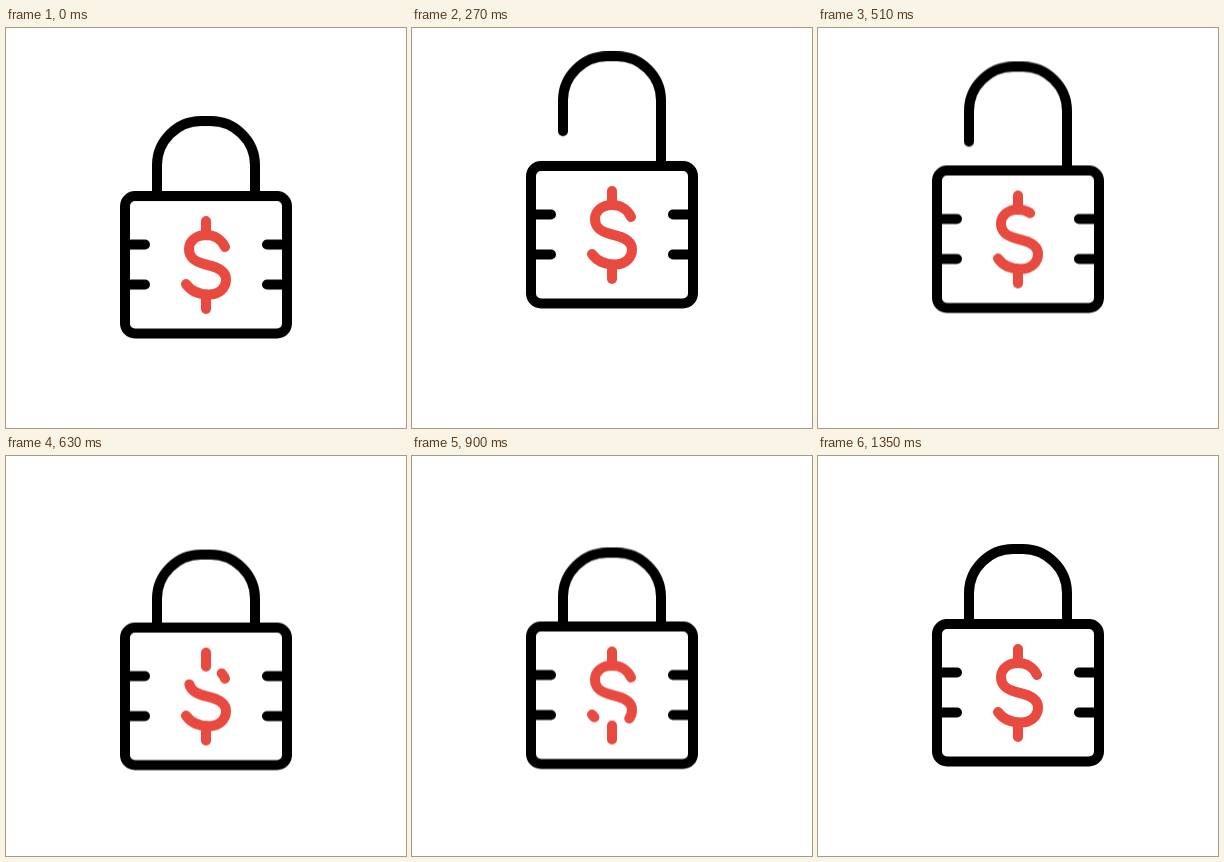
These frames come from a looping animation (400 px wide and 400 px high, 1.41 s). An HTML page:

```html
<!DOCTYPE html>
<html lang="en">
<head>
<meta charset="utf-8">
<title>Padlock</title>
<style>
  html, body { margin: 0; width: 100%; height: 100%; overflow: hidden; background: #fff; }
  svg { display: block; width: 100%; height: 100%; }
  .line { fill: none; stroke: #000; stroke-width: 10; stroke-linecap: round; stroke-linejoin: round; }
  .money { stroke: #e84a3f; }
  .curve { stroke-dasharray: 100 200; }

  .lock, .shackle, .curve { animation: 1410ms linear infinite; }
  .lock { animation-name: hop; }
  .shackle { animation-name: latch; }
  .tail { animation-name: erase; }
  .head { animation-name: draw; }

  /* squat, jump, land, settle */
  @keyframes hop {
    0% { transform: translateY(0); animation-timing-function: ease-in-out; }
    4.61% { transform: translateY(14px); animation-timing-function: cubic-bezier(.333, 1, .667, 1); }
    24.82% { transform: translateY(-31px); }
    26.24% { transform: translateY(-31px); animation-timing-function: cubic-bezier(.333, 0, .667, 0); }
    46.45% { transform: translateY(14px); animation-timing-function: cubic-bezier(.333, .667, .667, 1); }
    76.6%, 100% { transform: translateY(0); }
  }

  /* shackle relative to the body */
  @keyframes latch {
    0% { transform: translateY(0); animation-timing-function: ease-in-out; }
    4.61% { transform: translateY(7px); animation-timing-function: ease-out; }
    7.09% { transform: translateY(0); }
    10.28% { transform: translateY(0); animation-timing-function: cubic-bezier(.333, .8, .667, 1); }
    25.53% { transform: translateY(-40px); }
    26.6% { transform: translateY(-40px); animation-timing-function: cubic-bezier(.5, 0, .75, 0); }
    39.79% { transform: translateY(0); }
    44.11% { transform: translateY(0); }
    46.45% { transform: translateY(7px); animation-timing-function: cubic-bezier(.333, .667, .667, 1); }
    76.6%, 100% { transform: translateY(0); }
  }

  @keyframes erase {
    0% { stroke-dashoffset: 0; opacity: 1; }
    30.14% { stroke-dashoffset: 0; opacity: 1; animation-timing-function: cubic-bezier(.333, 0, .667, 1); }
    67.38% { stroke-dashoffset: -100; opacity: 1; }
    67.39%, 100% { stroke-dashoffset: -100; opacity: 0; }
  }

  @keyframes draw {
    0%, 39% { stroke-dashoffset: 100; opacity: 0; }
    39.01% { stroke-dashoffset: 100; opacity: 1; animation-timing-function: cubic-bezier(.33, 0, .2, 1); }
    95.04%, 100% { stroke-dashoffset: 0; opacity: 1; }
  }
</style>
</head>
<body>
<svg viewBox="0 0 400 400">
  <defs>
    <clipPath id="above"><rect x="100" y="-100" width="200" height="270"/></clipPath>
    <path id="ess" pathLength="100" d="M219 219C216 212 209 207 200 207C190 207 183 213 183 221C183 230 189 234 200 236.5C212 239 220 243 220 251.5C220 260 213 266.5 203 266.5C194 266.5 185 263 180 256"/>
  </defs>
  <g class="lock">
    <g clip-path="url(#above)">
      <path class="line shackle" d="M151 168V137C151 113 171 93 195 93H205C229 93 249 113 249 137V220"/>
    </g>
    <rect class="line" x="119" y="168" width="162" height="137.5" rx="10"/>
    <path class="line" d="M119 216.5H139M119 256.5H139M261 216.5H281M261 256.5H281"/>
    <path class="line money" d="M200 193V207M200 267V281"/>
    <use class="line money curve tail" href="#ess"/>
    <use class="line money curve head" href="#ess"/>
  </g>
</svg>
</body>
</html>
```
